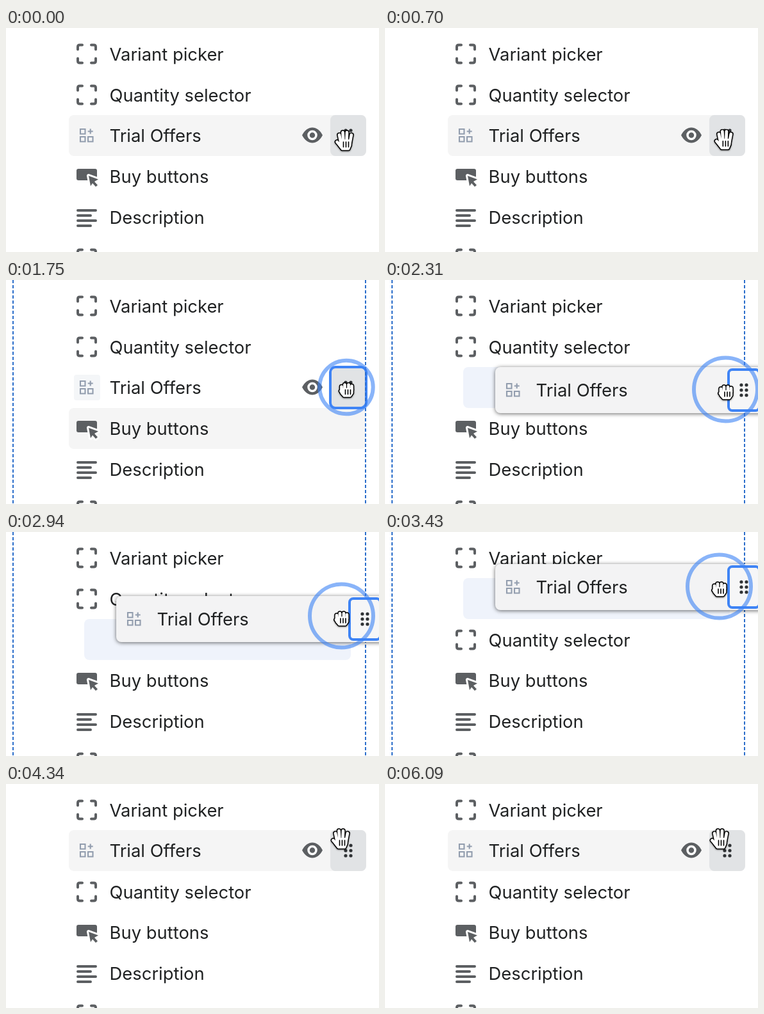
Animation of 582x350 px, one loop 6160 ms. Source, as an HTML page:

```html
<!DOCTYPE html>
<html lang="en">
<head>
<meta charset="utf-8">
<title>Reordering a block by drag and drop</title>
<style>
html, body { margin: 0; width: 100%; height: 100%; overflow: hidden; background: #fff; }
svg { display: block; }
text { font: 27.4px Inter, "Liberation Sans", sans-serif; fill: #202223; }
</style>
</head>
<body>
<svg id="stage" width="582" height="350" viewBox="0 0 582 350"></svg>
<script>
const LOOP = 6160, STEP = 70, ROW = 64;
const PRESS = 1470, LIFT = 1820, SWAP = 3080, DROP = 3710;
const stage = document.getElementById('stage');

// time, hand x, hand y, top of the lifted card
const track = [
  [0, 528.5, 176, 136], [560, 528.5, 176, 136], [1050, 531.5, 171.5, 136],
  [1800, 531.5, 171.5, 136], [2000, 532, 175, 136], [2750, 532, 175, 136],
  [2940, 524, 135, 100], [3080, 523, 115, 78], [3220, 522, 98, 60],
  [3360, 522, 89, 50], [4060, 522, 89, 50], [4340, 522.5, 86, 50], [LOOP, 522.5, 86, 50]
];

const ramp = (t, from, to) => Math.min(1, Math.max(0, (t - from) / (to - from)));

function pose(t) {
  const i = track.findIndex(k => k[0] > t), a = track[i - 1], b = track[i];
  const p = ramp(t, a[0], b[0]);
  return a.slice(1).map((v, n) => v + (b[n + 1] - v) * p);
}

const at = (x, y, body, extra = '') => `<g transform="translate(${x} ${y})" ${extra}>${body}</g>`;
const box = (x, y, w, h, fill, extra = 'rx="8"') =>
  `<rect x="${x}" y="${y}" width="${w}" height="${h}" fill="${fill}" ${extra}/>`;
const line = (d, color, width, extra = '') =>
  `<path d="${d}" fill="none" stroke="${color}" stroke-width="${width}" ${extra}/>`;

// Icons are drawn around their own centre
const icons = {
  brackets: [0, 90, 180, 270].map(a =>
    line('M-14-7V-11Q-14-14-11-14H-7', '#5c5f62', 4,
      `stroke-linecap="round" transform="rotate(${a})"`)).join(''),
  button: box(-16, -12, 32, 18, '#5c5f62', 'rx="3"') +
    '<path d="M3-1L18 4.500L12 8L17 13.500L14 16L9 10.500L6 15Z" fill="#5c5f62" stroke="#fff" stroke-width="6" paint-order="stroke" stroke-linejoin="round"/>',
  lines: line('M-14-11H14M-14-3H6M-14 5H14M-14 13H6', '#5c5f62', 4, 'stroke-linecap="round"'),
  apps: line('M-10-10h7.500v7.500h-7.500zM-10 2h7.500v7.500h-7.500zM2 2h7.500v7.500h-7.500zM5.700-10.500v8M1.700-6.500h8', '#929dae', 2.1)
};

const eye = `<path d="M-16 0C-12-8-6-12-0-12S12-8 16 0C12 8 6 12 0 12S-12 8-16 0Z" fill="#5c5f62"/>
  <circle r="6" fill="#5c5f62" stroke="#fff" stroke-width="3.5"/>`;

const dots = [-4, 4].flatMap(x => [-8, 0, 8].map(y =>
  `<circle cx="${x}" cy="${y}" r="2.6" fill="#303336"/>`)).join('');

function hand(fingers, palm, creases) {
  const round = 'stroke-linecap="round" stroke-linejoin="round"';
  const layer = (color, width, edge) => line(fingers, color, width, round) +
    `<path d="${palm}" fill="${color}" stroke="${color}" stroke-width="${edge}" stroke-linejoin="round"/>`;
  return '<g style="filter:drop-shadow(0 1.5px 1px rgba(0,0,0,.45))">' +
    layer('#000', 7.6, 6.4) + layer('#fff', 4.7, 3.4) + line(creases, '#000', 1.6, round) + '</g>';
}
const openHand = hand('M-8.500-9L-6 3M-3-13L-2 2M3.500-13L3 2M10.500-9L8 4M-12 2L-6 9',
  'M-6 0H8.500L8.500 7L6 13H-4L-8.500 7Z', 'M-2 2V10M2 2V10M6 2V10');
const closedHand = hand('M-8-5V0M-3-8V0M3-8V0M8-6V0M-9 2L-6 5',
  'M-7-1H8.500L8.500 5L5.500 9.500H-4L-8 5Z', 'M-2 0V7M2 0V7M6 0V7');

const row = (icon, label, mid) =>
  at(126, mid, icons[icon]) + `<text x="161.6" y="${mid + 10}">${label}</text>`;

const card = top => at(0, top,
  box(172, 0, 420, 72, '#f3f3f4', 'rx="8" style="filter:drop-shadow(0 1px 3px rgba(0,0,0,.6))"') +
  at(200, 36, icons.apps) + '<text x="235.6" y="46">Trial Offers</text>' +
  box(536, 4, 48, 64, '#f6f6f7', 'rx="6" stroke="#3f84f5" stroke-width="4"') +
  at(560, 36, dots));

function draw(t) {
  const [x, y, top] = pose(t);
  const swapped = t >= SWAP, lifted = t >= LIFT && t < DROP, pressed = t >= PRESS && t < DROP;
  const blockMid = swapped ? 104 : 168;
  const onNext = t >= 1050 && t < LIFT;
  const hover = t < LIFT ? 1 : ramp(t, 3920, 4130);
  let out = '';

  if (lifted) {
    out += box(122, blockMid - 32, 416, ROW, '#eff3fb');
  } else {
    const tools = box(506, blockMid - 32, 56, ROW, '#e1e3e5',
      pressed ? 'rx="8" stroke="#3f84f5" stroke-width="4"' : 'rx="8"') +
      at(478, blockMid - .5, eye) + at(534, blockMid, dots);
    out += at(0, 0, box(98, onNext ? 200 : blockMid - 32, 464, ROW, '#f5f5f5') + tools, `opacity="${hover}"`);
    if (onNext) out += box(106, 148, 41, 40, '#f4f6f8', 'rx="4"');
    out += row('apps', 'Trial Offers', blockMid);
  }

  out += row('brackets', 'Variant picker', 40.5) +
    row('brackets', 'Quantity selector', swapped ? 168.5 : 104.5) +
    row('button', 'Buy buttons', 232) +
    row('lines', 'Description', 296) +
    row('brackets', 'Collapsible row', 360.5);

  if (pressed) out += line('M11 0V350M561 0V350', '#2c6ecb', 2, 'stroke-dasharray="5 3"');
  if (lifted) out += card(top);
  if (t >= PRESS && t < 3920) {
    const r = 20 + 29.5 * ramp(t, PRESS, 1850);
    out += `<circle cx="${x - .5}" cy="${y - 4}" r="${r}" fill="none" stroke="#3b82f6"
      stroke-width="6" opacity="${.6 * (1 - ramp(t, 3640, 3920))}"/>`;
  }
  out += at(x, y, pressed ? closedHand : openHand);
  stage.innerHTML = out;
}

let shown = -1;
function tick() {
  const t = Math.floor(performance.now() % LOOP / STEP) * STEP;
  if (t !== shown) draw(shown = t);
  requestAnimationFrame(tick);
}
tick();
</script>
</body>
</html>
```
